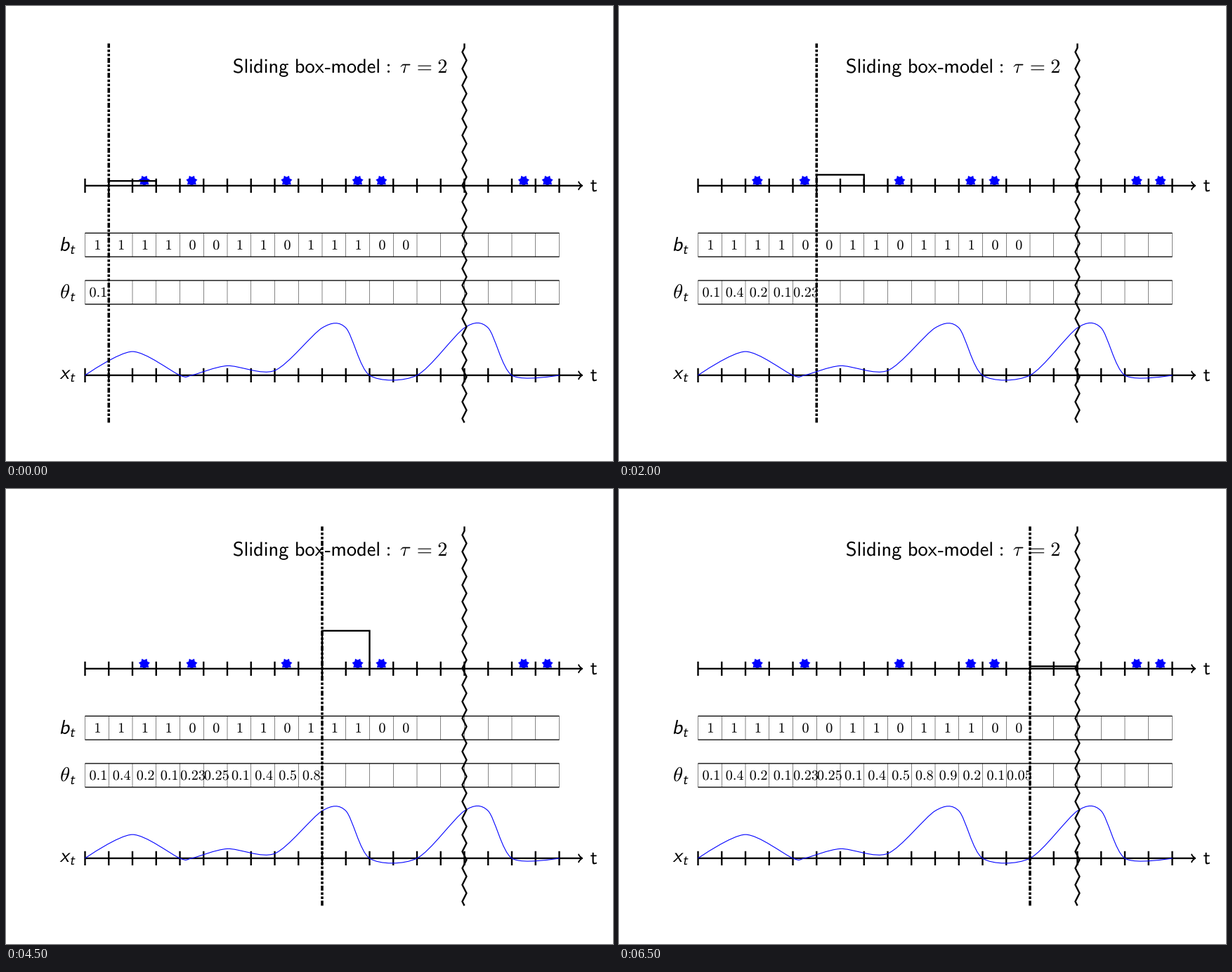
Write a matplotlib script that moves like this. It is 864 px wide and 648 px high and loops after 7 s.

```python
import matplotlib.pyplot as plt
import numpy as np
from matplotlib.animation import FuncAnimation
from matplotlib.patches import PathPatch, Polygon, Rectangle
from matplotlib.path import Path
from matplotlib.textpath import TextPath
from matplotlib.transforms import Affine2D

plt.rcParams["mathtext.fontset"] = "cm"
plt.rcParams["path.snap"] = False

W, H = 864, 648
U = 33.75                 # one time step in pixels
X0, Y0 = 112.5, 255.9     # origin of the upper axis
PT = W / 364.19           # one typographic point in pixels
TOP, BOTTOM = Y0 - 6 * U, Y0 + 10 * U
AXIS_Y = Y0 + 8 * U
STEPS = 20

BITS = "11110011011100"
THETA = [0.1, 0.4, 0.2, 0.1, 0.23, 0.25, 0.1, 0.4, 0.5, 0.8, 0.9, 0.2, 0.1, 0.05]
EVENTS = [2.5, 4.5, 8.5, 11.5, 12.5, 18.5, 19.5]
KNOTS = [(0, 0), (2, 1), (4, 0), (4.5, 0), (6, 0.4), (8, 0.2), (10, 2),
         (11, 2), (12, 0), (14, 0), (16, 2), (17, 2), (18, 0), (20, 0)]

fig = plt.figure(figsize=(W / 72, H / 72), dpi=72, facecolor="white")
ax = fig.add_axes([0, 0, 1, 1])
ax.set_xlim(0, W)
ax.set_ylim(H, 0)
ax.axis("off")


def px(k):
    return X0 + k * U


def line(xs, ys, lw=PT, z=3, **kw):
    style = dict(color="black", solid_capstyle="butt", solid_joinstyle="miter")
    return ax.plot(xs, ys, lw=lw, zorder=z, **{**style, **kw})[0]


def label(tex, cx, base, size, slant=0.0):
    """Draw math text with its ink centred on cx and its baseline at base."""
    path = TextPath((0, 0), f"${tex}$", size=size)
    path = path.transformed(Affine2D.from_values(1, 0, slant, -1, 0, 0))
    box = path.get_extents()
    path = path.transformed(Affine2D().translate(cx - (box.x0 + box.x1) / 2, base))
    return ax.add_patch(PathPatch(path, fc="black", lw=0, zorder=5))


def sans(s, *args, **kw):
    return label(rf"\mathsf{{{s}}}", *args, **kw)


def time_axis(y):
    a = (0.28 + 0.3) * PT
    tip = px(21) - 0.75 * a - 0.4 * PT
    line([X0, tip + 0.5 * a], [y, y])
    for k in range(STEPS + 1):
        line([px(k)] * 2, [y - 0.3 * U, y + 0.3 * U])
    barbs = np.array([(-3, 4), (-2.75, 2.5), (0, 0.25), (0.75, 0),
                      (0, -0.25), (-2.75, -2.5), (-3, -4)]) * a + (tip, y)
    ax.add_patch(PathPatch(Path(barbs, [Path.MOVETO] + [Path.CURVE4] * 6), fc="none",
                           ec="black", lw=0.8 * PT, capstyle="round",
                           joinstyle="round", zorder=3))
    sans("t", 836.6, y + 8.4, 28.4)


def row(y):
    for yy in (y, y + U):
        line([X0, px(STEPS)], [yy, yy], lw=1.3)
    for k in range(STEPS + 1):
        line([px(k)] * 2, [y, y + U], lw=0.2 * PT)


def star(k):
    ang = np.pi / 2 + np.arange(14) * np.pi / 7
    r = np.where(np.arange(14) % 2 == 0, 8.2, 5.6)
    pts = np.column_stack([px(k) + r * np.cos(ang), Y0 - 0.2 * U + r * np.sin(ang)])
    ax.add_patch(Polygon(pts, fc="blue", lw=0, zorder=2))


def smooth(knots, tension=0.13875):
    """Bezier path whose tangents follow the neighbouring knots."""
    p = np.array(knots, float)
    d = np.zeros_like(p)
    d[1:-1] = tension * (p[2:] - p[:-2])
    pts = [p[0]]
    for i in range(len(p) - 1):
        pts += [p[i] + d[i], p[i + 1] - d[i + 1], p[i + 1]]
    pts = np.array(pts) * (U, -U) + (X0, AXIS_Y)
    return Path(pts, [Path.MOVETO] + [Path.CURVE4] * (len(pts) - 1))


def zigzag(x, amp=3.0, seg=10 * PT):
    n = np.arange(45)
    ys = BOTTOM - seg / 4 - n * seg / 2
    xs = x - amp * (-1.0) ** n
    line([x, *xs, x, x], [BOTTOM, *ys, ys[-1] - seg / 4, TOP], z=4)


# Title
for s, cx in (("Sliding", 363), ("box", 432.9), ("model", 497.7), (":", 544.5), ("2", 621.3)):
    sans(s, cx, 95.2, 28.4)
label(r"\tau", 568.5, 95.2, 28.4)
label("=", 595.8, 95.2, 28.4)
ax.add_patch(Rectangle((454, 88.2), 7.4, 1.9, fc="black", lw=0, zorder=5))

# Fixed diagram
time_axis(Y0)
time_axis(AXIS_Y)
row(Y0 + 2 * U)
row(Y0 + 4 * U)
for k in EVENTS:
    star(k)
ax.add_patch(PathPatch(smooth(KNOTS), fc="none", ec="blue", lw=1.1, zorder=4))
zigzag(px(16))

SLANT = 0.2126
sans("b", 84.2, 348.8, 28.4, slant=SLANT)
label(r"\theta", 84.2, 416.2, 28.4)
sans("x", 84.2, 531.2, 28.4, slant=SLANT)
for base in (353, 420.4, 535.2):
    sans("t", 95.4, base, 20, slant=SLANT)

for i, bit in enumerate(BITS):
    sans(bit, px(i + 0.5) + 1.1, 346.8, 20.2)

# Moving parts
values = [sans(f"{v:g}", px(i + 0.5) + 1.6, 414.2, 20.2) for i, v in enumerate(THETA)]
box = line([], [], z=4)
LW = 1.5 * PT
cursor = line([], [], lw=LW, z=4, dash_capstyle="butt",
              linestyle=(0, [3 * PT / LW, PT / LW, 1, PT / LW, 1, PT / LW]))


def update(i):
    left, right = px(i + 1), px(i + 3)
    roof = Y0 - 2 * U * THETA[i]
    cursor.set_data([left, left], [BOTTOM, TOP])
    box.set_data([left, left, right, right], [Y0, roof, roof, Y0])
    for j, v in enumerate(values):
        v.set_visible(j <= i)
    return [cursor, box, *values]


anim = FuncAnimation(fig, update, frames=len(THETA), interval=500,
                     repeat=True, repeat_delay=0, blit=False)
plt.show()
```
